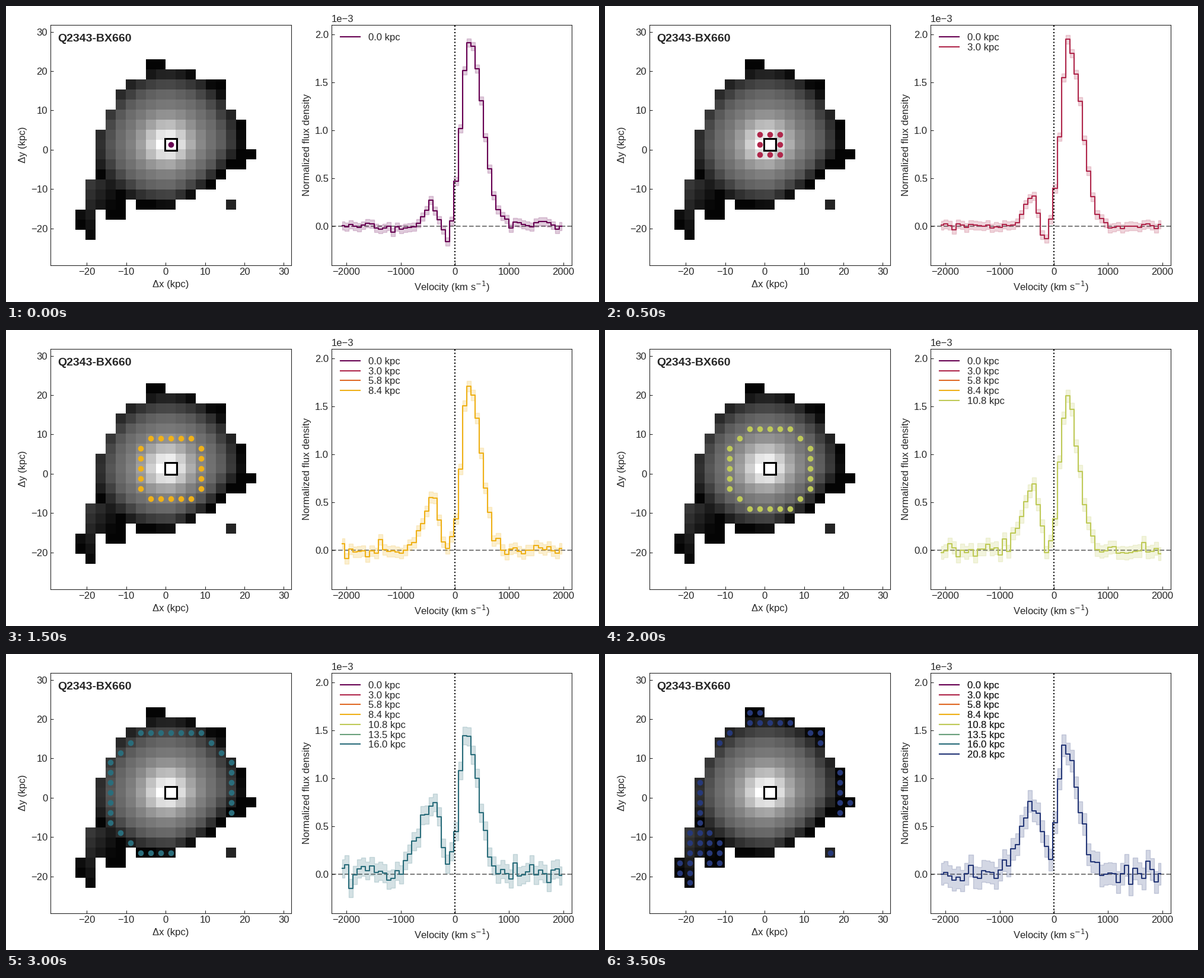
Recreate the animation shown at these times as a matplotlib script. Size 1000x500 px, loop 4 s.

```python
import matplotlib.pyplot as plt
import numpy as np
from matplotlib.animation import ArtistAnimation

plt.rcParams.update({
    "font.family": "Liberation Sans", "font.size": 12,
    "text.color": "0.15", "axes.labelcolor": "0.15", "axes.edgecolor": "0.15",
    "xtick.color": "0.15", "ytick.color": "0.15",
    "xtick.direction": "in", "ytick.direction": "in",
})

WIDTH, HEIGHT = 1000, 500
TOP, BOTTOM = 31.6, 437.6               # panel edges, in pixels
CELL, CX, CY = 16.92, 278, 234.2        # map cell size and centre, in pixels
CENTRE_ROW, CENTRE_COL, SIZE = 8, 9, 18

COLORS = ["#670052", "#b0284c", "#e06a26", "#efb118",
          "#bfca58", "#6aa07c", "#2a6d7b", "#263878"]
RADII = [0.0, 3.0, 5.8, 8.4, 10.8, 13.5, 16.0, 20.8]
VELOCITY = -2075 + 77.7 * np.arange(53)


def peak(centre, left, right):
    """Unit Gaussian with separate widths on its two sides."""
    offset = VELOCITY - centre
    return np.exp(-0.5 * (offset / np.where(offset < 0, left, right)) ** 2)


def error(step):
    return 0.043 + 0.00145 * step ** 2


def line_profile(step):
    """Double-peaked line: the red side fades and the blue side grows outwards."""
    def at(*values):
        return np.interp(step, [0, 2, 4, 5, 7], values)

    red = at(1.95, 1.85, 1.63, 1.53, 1.38) * peak(
        at(270, 268, 235, 195, 215), at(150, 131, 122, 105, 138),
        at(242, 238, 210, 212, 235))
    blue = at(0.24, 0.38, 0.68, 0.75, 0.78) * peak(
        at(-430, -375, -375, -390, -420), at(110, 190, 210, 220, 240),
        at(85, 75, 105, 130, 190))
    dip = 0.22 * np.exp(-step / 1.5) * peak(-125, 60, 60)
    noise = np.random.default_rng(step).normal(0, 0.6 * error(step),
                                               VELOCITY.size)
    return red + blue - dip + noise


def brightness(dx, dy):
    """Grey level of a lopsided core with a faint streak to the lower left."""
    u, v = dx + 0.35, dy * np.where(dy > 0, 1.22, 1)
    r = np.hypot(u, v) + 0.08 * np.maximum(dx, 0) * np.maximum(dy, 0)
    core = np.interp(r, [0.7, 1.1, 1.5, 2, 2.5, 3.2, 4, 5, 5.6, 6.3, 7, 7.5],
                     [255, 234, 215, 190, 165, 140, 120, 103, 88, 60, 36, 4])
    streak = 95 - 9.5 * dy - 15 * abs(dx + 8)
    return np.where((dx < -4) & (dy > 3), np.maximum(core, streak), core)


def make_map():
    row, col = np.mgrid[:SIZE, :SIZE]
    first = np.rint(np.interp(row, [0, 1, 2, 4, 7, 12, 14, 15, 16, 17],
                              [7, 7, 5, 3.6, 2.4, 1.4, 1, 0, 0, 1]))
    last = np.rint(np.interp(row, [0, 2, 4, 6, 8, 9, 10, 12, 14, 15, 16],
                             [8, 14, 14, 16, 16, 17, 16, 13, 9, 4, 1]))
    inside = (col >= first) & (col <= last)
    inside[14, 5] = inside[15, 2] = False
    level = np.where(inside, brightness(col - CENTRE_COL, row - CENTRE_ROW),
                     np.nan)
    level[14, 15] = 36                  # detached speck
    return level


def make_axes(left, right, xlim, ylim):
    ax = fig.add_axes([left / WIDTH, 1 - BOTTOM / HEIGHT,
                       (right - left) / WIDTH, (BOTTOM - TOP) / HEIGHT])
    ax.set(xlim=xlim, ylim=ylim)
    return ax


fig = plt.figure(figsize=(10, 5), dpi=100, facecolor="white")

sky = make_axes(75, 481, (-29.25, 31.9), (-29.35, 31.8))
sky.set(xlabel="Δx (kpc)", ylabel="Δy (kpc)",
        xticks=range(-20, 31, 10), yticks=range(-20, 31, 10))

plot = make_axes(549, 954, (-2275, 2156), (-0.405, 2.101))
plot.set(xlabel="Velocity (km s$^{-1}$)", ylabel="Normalized flux density",
         xticks=range(-2000, 2001, 1000), yticks=np.arange(0, 2.1, 0.5))
plot.axhline(0, color="gray", ls="--", lw=1.5, zorder=1)
plot.axvline(0, color="black", ls=":", lw=1.5, zorder=4)

# Overlay measured in stage pixels
stage = fig.add_axes([0, 0, 1, 1])
sky_map = make_map()
x0, y0 = CX - (CENTRE_COL + 0.5) * CELL, CY - (CENTRE_ROW + 0.5) * CELL
stage.imshow(sky_map, cmap="gray", vmin=0, vmax=255, interpolation="nearest",
             aspect="auto",
             extent=(x0, x0 + SIZE * CELL, y0 + SIZE * CELL, y0))
stage.set(xlim=(0, WIDTH), ylim=(HEIGHT, 0))
stage.axis("off")
stage.text(87, 60, "Q2343-BX660", size=14, weight="bold")
stage.text(549, 27, "1e−3")
stage.plot(CX, CY, "s", ms=14.4, mfc="none", mec="black", mew=2.2, zorder=3)

rows, cols = np.nonzero(~np.isnan(sky_map))
dx, dy = cols - CENTRE_COL, rows - CENTRE_ROW
dist2 = dx ** 2 + dy ** 2
ring_index = np.where(dist2 > 45, 7, np.sqrt(dist2).astype(int))


def ring(step):
    hit = ring_index == step
    return stage.plot(CX + dx[hit] * CELL, CY + dy[hit] * CELL, "o",
                      ms=7, mew=0, color=COLORS[step], zorder=4)


def spectrum(step):
    flux, err, color = line_profile(step), error(step), COLORS[step]
    band = plot.fill_between(VELOCITY, flux - err, flux + err, step="mid",
                             color=color, alpha=0.2, lw=1, zorder=2)
    return [band] + plot.plot(VELOCITY, flux, drawstyle="steps-mid",
                              color=color, lw=1.5, zorder=3)


def legend(step):
    artists = []
    for i in range(step + 1):
        y = 52 + 16.72 * i
        artists += stage.plot([564, 597.3], [y, y], color=COLORS[i], lw=1.5)
        artists.append(stage.text(611, y + 6, f"{RADII[i]:.1f} kpc"))
    return artists


scenes = [ring(k) + spectrum(k) + legend(k) for k in range(len(RADII))]
scenes[-1] += legend(len(RADII) - 1)    # the closing legend is printed twice

anim = ArtistAnimation(fig, scenes, interval=500, repeat=True, repeat_delay=0)
plt.show()
```
